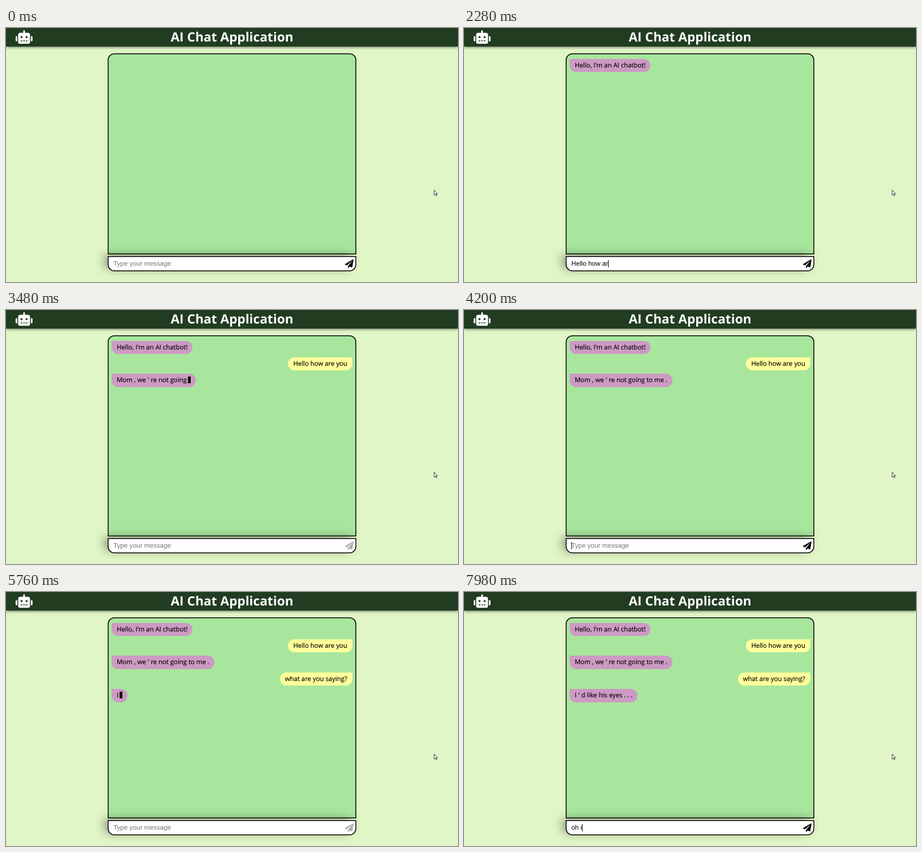
Recreate the animation shown at these times as an HTML page. Size 800 by 451 pixels, loop 8 s.

```html
<!DOCTYPE html>
<html lang="en">
<head>
<meta charset="utf-8">
<title>AI Chat Application</title>
<style>
html, body { margin: 0; width: 100%; height: 100%; overflow: hidden; }
body { position: relative; background: #e1f6c6; text-rendering: geometricPrecision; }
body * { box-sizing: border-box; }
header, #log, #box, .msg, svg, #field { position: absolute; white-space: pre; }
header {
  left: 0; top: 0; width: 100%; height: 33px; background: #213c21;
  box-shadow: 0 1px 5px rgba(0, 0, 0, .6);
  color: #fff; text-align: center; font: bold 22.7px/32.5px "Open Sans", sans-serif;
}
#log, #box { left: 180px; width: 440px; --line: inset 0 0 0 1.5px #000; }
#log { top: 45px; height: 357px; background: #a8e69e; border-radius: 12px 12px 0 0; box-shadow: var(--line); }
#box {
  top: 405px; height: 27px; background: #fff; border-radius: 0 0 12px 12px;
  box-shadow: var(--line), -8px -3px 18px -3px rgba(0, 0, 0, .5);
}
.msg {
  height: 23.5px; padding: 0 9px; color: #000; -webkit-text-stroke: .15px #000;
  font: 11.4px/23.5px "Open Sans", sans-serif;
}
.bot { left: 187px; background: #cd9ac3; border-radius: 0 12px 12px 12px; }
.user { right: 187px; background: #feff9b; border-radius: 12px 0 12px 12px; }
.typing::after {
  content: ""; display: inline-block; width: 5.5px; height: 12px;
  margin-left: 1.5px; background: #111; vertical-align: -2px;
}
#field { left: 190px; top: 404.5px; font: 11.7px/27px "Liberation Sans", Arial, sans-serif; }
#caret { position: absolute; top: 7px; width: 1px; height: 13px; background: #000; }
#hint { color: #757575; }
</style>
</head>
<body>
<header>AI Chat Application</header>
<svg style="left:17px;top:4px" width="30" height="24" viewBox="0 0 640 512" fill="#fff">
  <path fill-rule="evenodd" d="M32 224H64V416H32A32 32 0 0 1 0 384V256A32 32 0 0 1 32 224ZM544 176V448A64 64 0 0 1 480 512H160A64 64 0 0 1 96 448V176A80 80 0 0 1 176 96H288V32A32 32 0 0 1 352 32V96H464A80 80 0 0 1 544 176ZM264 256A40 40 0 1 0 184 256A40 40 0 1 0 264 256ZM456 256A40 40 0 1 0 376 256A40 40 0 1 0 456 256ZM192 384h64v32h-64ZM288 384h64v32h-64ZM384 384h64v32h-64ZM640 256V384A32 32 0 0 1 608 416H576V224H608A32 32 0 0 1 640 256Z"/>
</svg>
<div id="log"></div>
<div id="box"></div>
<div id="field"><span id="hint">Type your message</span><span id="typed"></span><i id="caret"></i></div>
<svg id="send" style="left:599.5px;top:410.5px" width="15" height="15" viewBox="0 0 512 512">
  <path d="M476 3L12 271c-18 10-15 35 3 43L121 358L408 105c6-5 14 3 9 9L176 407v80c0 24 28 33 42 16L282 426L407 478c14 6 30-3 33-18L512 28C515 8 493-7 476 3Z"/>
</svg>
<svg style="left:757px;top:287px" width="9" height="13" viewBox="0 0 9 13">
  <path d="M.8.8V9.6L2.8 7.8L4.2 11L5.6 10.4L4.2 7.3H6.8Z" fill="#fff" stroke="#222" stroke-width=".9"/>
</svg>
<script>
const LOOP = 8000, CHAR = 24, BLINK = 240, HOLD = 35, REPLY = 150, ROW = 29.4;
const $ = id => document.getElementById(id);

// Replies type out from `at`; user messages pop in when sent.
const messages = [
  { who: 'bot', at: 260, text: "Hello, I'm an AI chatbot!" },
  { who: 'user', at: 2760, text: 'Hello how are you' },
  { who: 'bot', at: 2760 + REPLY, text: "Mom , we ' re not going to me ." },
  { who: 'user', at: 5580, text: 'what are you saying?' },
  { who: 'bot', at: 5580 + REPLY, text: "I ' d like his eyes . . ." }
];
// first: moment of the first key, step: time per key
const drafts = [
  { first: 1620, step: 60, sent: 2760, text: messages[1].text },
  { first: 4260, step: 60, sent: 5580, text: messages[3].text },
  { first: 7560, step: 120, sent: LOOP, text: 'oh i' }
];
const endOf = m => m.at + m.text.length * CHAR + HOLD;
const waits = [2, 4].map(i => ({ from: messages[i - 1].at, to: endOf(messages[i]) }));

messages.forEach((m, i) => {
  m.el = document.createElement('div');
  m.el.style.top = 54.5 + i * ROW + 'px';
  document.body.append(m.el);
});

function draw(t) {
  for (const m of messages) {
    const bot = m.who === 'bot';
    m.el.hidden = t < m.at;
    m.el.className = `msg ${m.who}${bot && t < endOf(m) ? ' typing' : ''}`;
    m.el.textContent = bot ? m.text.slice(0, Math.max(0, Math.floor((t - m.at) / CHAR))) : m.text;
  }

  const draft = drafts.find(d => t >= d.first && t < d.sent);
  const text = draft ? draft.text.slice(0, Math.floor((t - draft.first) / draft.step) + 1) : '';
  $('typed').textContent = text;
  $('hint').hidden = !!text;

  const waiting = waits.some(w => t >= w.from && t < w.to);
  const last = waits.filter(w => t >= w.to).pop();
  const focus = last ? last.to : 120;
  const blinkOn = Math.floor((t - focus) / BLINK) % 2 === 0;
  $('caret').hidden = waiting || !(text || blinkOn);
  $('caret').style.left = (text ? $('typed').getBoundingClientRect().width : 0) + 'px';

  const wake = last ? Math.min(1, (t - last.to) / BLINK) : 1;
  $('send').style.opacity = waiting ? .32 : .32 + .68 * wake;
}

const start = performance.now();
(function tick() {
  draw((performance.now() - start) % LOOP);
  requestAnimationFrame(tick);
})();
</script>
</body>
</html>
```
